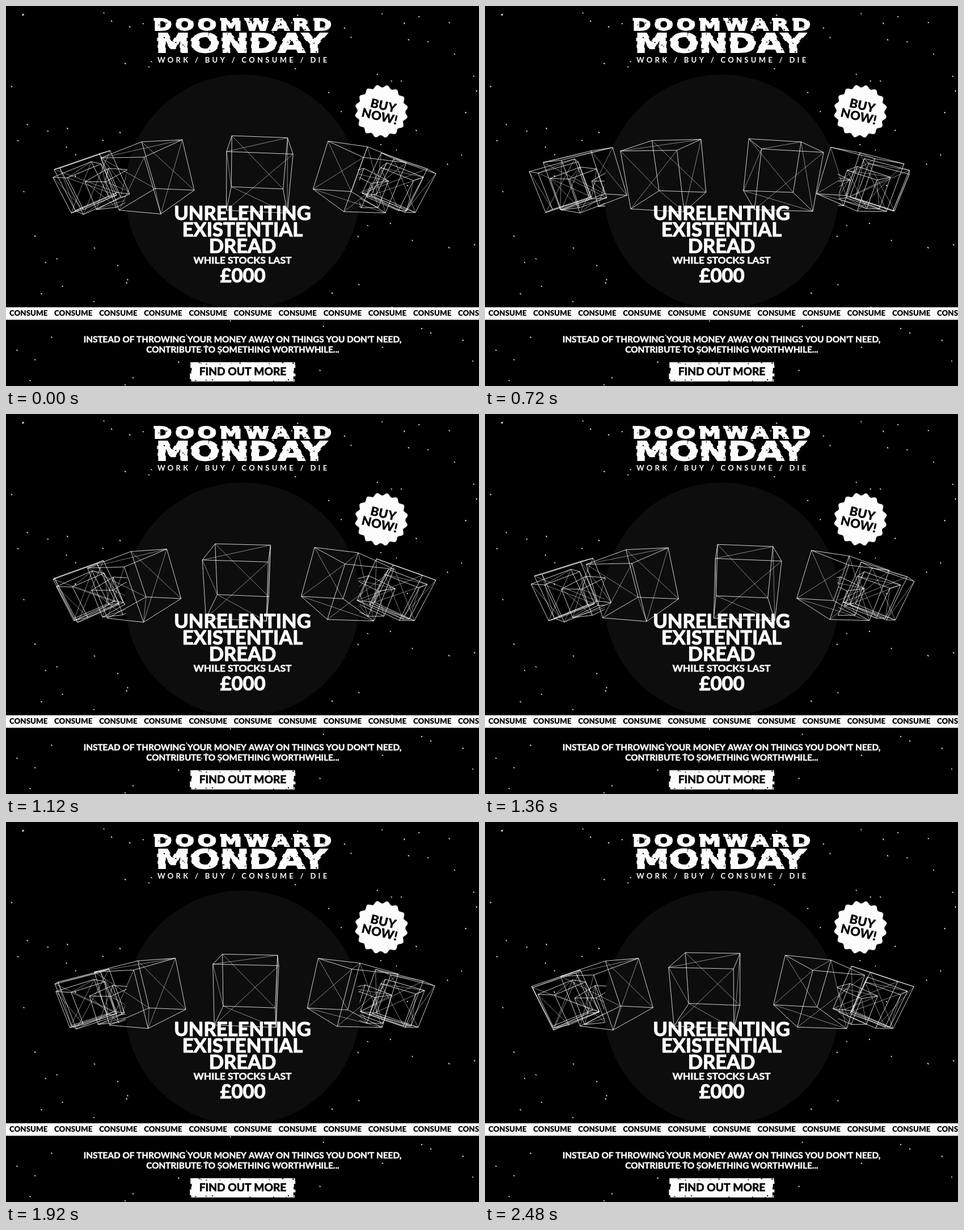
These frames come from a looping animation (834 px wide and 671 px high, 2520 ms). An HTML page with a canvas:

```html
<!DOCTYPE html>
<html lang="en">
<head>
<meta charset="utf-8">
<title>Doomward Monday</title>
<style>
html, body { margin: 0; width: 100%; height: 100%; overflow: hidden; background: #000; }
canvas { display: block; }
</style>
</head>
<body>
<canvas id="stage" width="834" height="671"></canvas>
<script>
const W = 834, H = 671, LOOP = 2520, TICK = 40, TAU = 2 * Math.PI, DEG = Math.PI / 180;
const ctx = document.getElementById('stage').getContext('2d');
const SANS = 'Lato, "Open Sans", sans-serif';
const WHITE = '#fcfcfc', BLACK = '#000';

// Ring of cubes; lengths are in cube sides
const COUNT = 14, RADIUS = 4.43, CAMERA = 9.78, FOCAL = 550, LIFT = 0.405;
const CENTER = { x: 417, y: 335.5 };
const DISC = { x: 417, y: 328, r: 207 };

function seeded(seed) {
  return () => (seed = (seed * 1664525 + 1013904223) % 4294967296) / 4294967296;
}

function layer(paint) {
  const c = document.createElement('canvas');
  c.width = W;
  c.height = H;
  paint(c.getContext('2d'));
  return c;
}

// A thin outline thickens the letters in proportion to their size
function label(g, text, x, y, size, { weight = 700, color = WHITE, align = 'center', spacing = 0, outline = 0.035 } = {}) {
  g.font = `${weight} ${size}px ${SANS}`;
  g.textAlign = align;
  g.letterSpacing = spacing + 'px';
  g.fillStyle = g.strokeStyle = color;
  g.lineJoin = 'round';
  g.lineWidth = size * outline;
  g.fillText(text, x, y);
  if (outline) g.strokeText(text, x, y);
  g.letterSpacing = '0px';
}

function specks(g, random, count, x, y, w, h) {
  g.fillStyle = BLACK;
  for (let i = 0; i < count; i++) {
    g.fillRect(x + random() * w, y + random() * h, 1 + random() * 2, 1 + random());
  }
}

function paintStars(g) {
  const random = seeded(41);
  g.fillStyle = '#eee';
  for (let i = 0; i < 125; i++) {
    const x = random() * W, y = random() * H, angle = 0.4 + random() * 0.8;
    if (Math.hypot(x - DISC.x, y - DISC.y) < DISC.r) continue;
    g.save();
    g.translate(x, y);
    g.rotate(angle);
    g.fillRect(-1.4, -0.8, 2 + random(), 1.6);
    g.restore();
  }
}

function extended(g, text, x, y, size, spacing) {
  g.save();
  g.translate(x, y);
  g.scale(1.35, 1);
  g.font = `700 ${size}px "DejaVu Sans", sans-serif`;
  g.textAlign = 'center';
  g.letterSpacing = spacing + 'px';
  g.fillStyle = g.strokeStyle = WHITE;
  g.lineWidth = 1.8;
  g.fillText(text, spacing / 2, 0);
  g.strokeText(text, spacing / 2, 0);
  g.restore();
}

function paintTitle(g) {
  // Horizontal bands, some slipped sideways
  const random = seeded(12), band = 6;
  for (let top = 14; top < 90; top += band) {
    const slip = random() < 0.35 ? Math.round(random() * 6 - 3) : 0;
    g.save();
    g.beginPath();
    g.rect(200, top, 434, band);
    g.clip();
    extended(g, 'DOOMWARD', 417 + slip, 42.5, 29, 4.4);
    extended(g, 'MONDAY', 415 + slip, 81.5, 45.5, 0);
    g.restore();
  }
  specks(g, random, 50, 260, 20, 310, 62);
  label(g, 'WORK / BUY / CONSUME / DIE', 267, 100, 13, { align: 'left', spacing: 4.3, outline: 0 });
}

function paintBadge(g) {
  g.save();
  g.translate(662, 186);
  g.rotate(13 * DEG);
  g.fillStyle = WHITE;
  g.beginPath();
  for (let a = 0; a < TAU; a += 2 * DEG) {
    const r = 44.5 + 2.4 * Math.cos(16 * a);
    g.lineTo(r * Math.cos(a), r * Math.sin(a));
  }
  g.fill();
  const ink = { weight: 900, color: BLACK, outline: 0 };
  label(g, 'BUY', 1, -3, 22, ink);
  label(g, 'NOW!', -1, 17, 22, ink);
  g.restore();
}

function paintButton(g) {
  const random = seeded(5);
  g.fillStyle = WHITE;
  for (let y = 629; y < 663; y += 5) {
    const left = 324 + random() * 5;
    g.fillRect(left, y, 506 + random() * 5 - left, Math.min(5, 663 - y));
  }
  specks(g, random, 10, 325, 629, 184, 3);
  specks(g, random, 10, 325, 659, 184, 3);
  label(g, 'FIND OUT MORE', 417.5, 652, 19.2, { color: BLACK });
}

function paintFront(g) {
  paintTitle(g);
  paintBadge(g);

  ['UNRELENTING', 'EXISTENTIAL', 'DREAD'].forEach((word, i) => label(g, word, 417, 378 + 29 * i, 34.6));
  label(g, 'WHILE STOCKS LAST', 417, 455, 17.5);
  label(g, '£000', 417.5, 488, 34.6);

  g.fillStyle = WHITE;
  g.fillRect(0, 532, W, 22);
  for (let x = 6; x < W; x += 79.1) {
    label(g, 'CONSUME', x, 547, 13.3, { weight: 900, color: BLACK, align: 'left', outline: 0 });
  }

  label(g, "INSTEAD OF THROWING YOUR MONEY AWAY ON THINGS YOU DON'T NEED,", 417, 594, 15.3);
  label(g, 'CONTRIBUTE TO SOMETHING WORTHWHILE...', 417.5, 612, 15.3);
  paintButton(g);
}

// Corner bits: 1 = right, 2 = top, 4 = outer face
const CORNERS = [...Array(8).keys()];
const EDGES = CORNERS.flatMap(c => [1, 2, 4].filter(bit => !(c & bit)).map(bit => [c, c | bit]));
const DIAGONALS = ['47', '12', '53', '06', '63', '05'];

function project(corner, angle, yaw, pitch) {
  const [u0, v0, w0] = [1, 2, 4].map(bit => (corner & bit ? 0.5 : -0.5));
  const u = u0 * Math.cos(yaw) - w0 * Math.sin(yaw);
  const w = u0 * Math.sin(yaw) + w0 * Math.cos(yaw);
  const v = v0 * Math.cos(pitch) - w * Math.sin(pitch);
  const out = RADIUS + w * Math.cos(pitch) + v0 * Math.sin(pitch);
  const sin = Math.sin(angle), cos = Math.cos(angle);
  const scale = FOCAL / (CAMERA - out * cos + u * sin);
  const lift = LIFT - 0.17 * sin * sin;
  return [CENTER.x + (out * sin + u * cos) * scale, CENTER.y - (v + lift) * scale];
}

function strokeLines(points, pairs, alpha) {
  ctx.globalAlpha = alpha;
  ctx.beginPath();
  for (const [a, b] of pairs) {
    ctx.moveTo(...points[a]);
    ctx.lineTo(...points[b]);
  }
  ctx.stroke();
  ctx.globalAlpha = 1;
}

function drawCubes(step, inFront) {
  const pitch = (21.3 + 3.7 * Math.cos((step - 27) / 29 * TAU)) * DEG;
  const turn = (3.5 - 3.965 * step) * DEG;
  ctx.strokeStyle = '#fff';
  ctx.lineWidth = 1;
  for (let i = 0; i < COUNT; i++) {
    const angle = turn + i * TAU / COUNT;
    if ((Math.cos(angle) > 0) !== inFront) continue;
    const points = CORNERS.map(c => project(c, angle, 6 * DEG, pitch));
    strokeLines(points, EDGES, 0.8);
    strokeLines(points, DIAGONALS, 0.5);
  }
}

// Motion advances in ticks: held at the start, one tick lost midway, a short stall later
function stepAt(ms) {
  const stalled = ms >= 1680 && ms < 1800;
  const tick = Math.floor((stalled ? 1680 : ms) / TICK);
  return Math.max(0, tick - (ms < 1200 ? 1 : 2));
}

const stars = layer(paintStars);
const front = layer(paintFront);

function draw(now) {
  const step = stepAt(now % LOOP);
  ctx.fillStyle = BLACK;
  ctx.fillRect(0, 0, W, H);
  ctx.drawImage(stars, 0, 0);
  drawCubes(step, false);
  ctx.fillStyle = '#0d0d0d';
  ctx.beginPath();
  ctx.arc(DISC.x, DISC.y, DISC.r, 0, TAU);
  ctx.fill();
  drawCubes(step, true);
  ctx.drawImage(front, 0, 0);
}

const start = performance.now();
function loop() {
  draw(performance.now() - start);
  requestAnimationFrame(loop);
}
loop();
</script>
</body>
</html>
```
